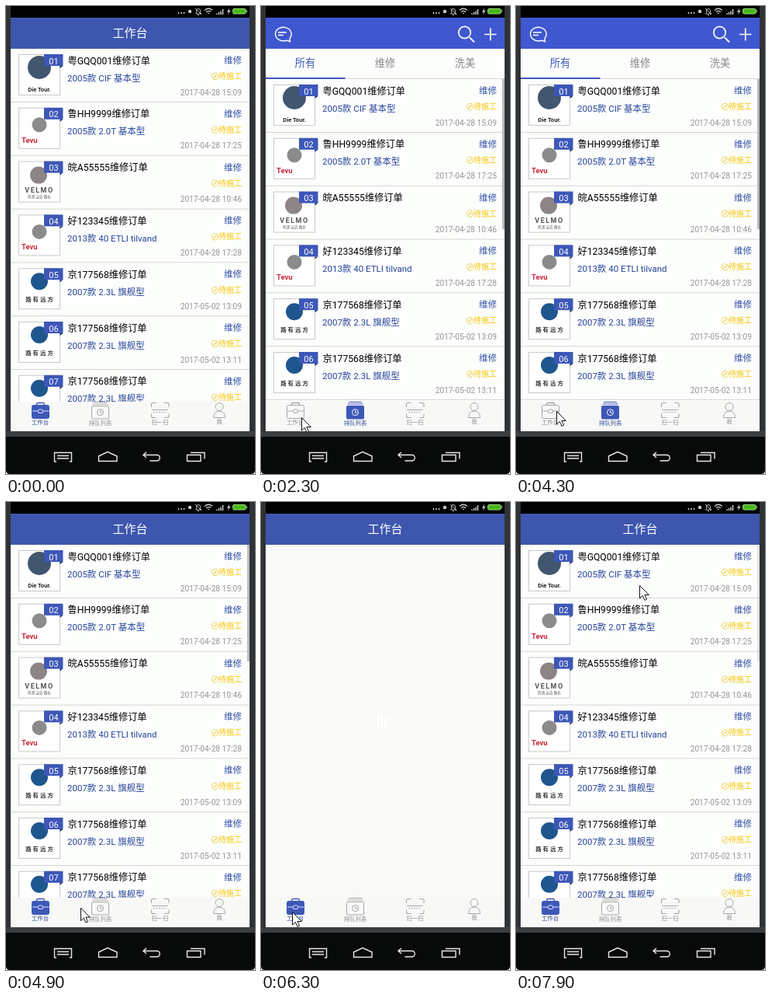
Recreate the animation shown at these times as an HTML page. Size 321x602 px, loop 8 s.

```html
<!DOCTYPE html>
<html lang="zh-CN">
<head>
<meta charset="utf-8">
<title>工作台</title>
<style>
  html, body { margin: 0; width: 100%; height: 100%; overflow: hidden; background: #fff; }
  svg { display: block; width: 100%; height: 100%; }
  text { font-family: Roboto, 'Noto Sans CJK SC', 'Noto Sans CJK', sans-serif; }
  .line { fill: none; stroke: currentColor; }
  .mid { text-anchor: middle; }
  .end { text-anchor: end; }
</style>
</head>
<body>
<svg id="stage" viewBox="0 0 321 602"></svg>
<script>
const LOOP = 8000, STEP = 100;
const BLUE = '#3d57b8', ROW = 68.8;

const text = (x, y, size, fill, str, cls = '', extra = '') =>
  `<text x="${x}" y="${y}" font-size="${size}" fill="${fill}" class="${cls}" ${extra}>${str}</text>`;
const rect = (x, y, w, h, fill, extra = '') =>
  `<rect x="${x}" y="${y}" width="${w}" height="${h}" fill="${fill}" ${extra}/>`;
const path = (d, color, width = 1, extra = '') =>
  `<path class="line" d="${d}" color="${color}" stroke-width="${width}" ${extra}/>`;
const circle = (x, y, r, fill, extra = '') =>
  `<circle cx="${x}" cy="${y}" r="${r}" fill="${fill}" ${extra}/>`;

// Thumbnails, relative to the top of a row.
const thumbs = {
  tour: circle(43, 24, 15, '#42566f') +
    text(43, 54.5, 7.6, '#222', 'Die Tour.', 'mid', 'font-weight="700"'),
  tevu: circle(43, 29, 9.5, '#8b8b8b') +
    text(20, 52, 9.5, '#c8283c', 'Tevu', '', 'font-weight="700"'),
  velmo: circle(42, 25, 11, '#8d8585') +
    text(43, 47, 9, '#555', 'VELMO', 'mid', 'font-weight="700" letter-spacing="1.5"') +
    text(43, 54, 4.6, '#555', '风清 云近 路长', 'mid'),
  road: circle(43, 24, 11, '#1f568e') +
    text(44, 50, 7.4, '#333', '路有远方', 'mid', 'font-weight="700" letter-spacing="2"')
};

const orders = [
  ['tour', '粤GQQ001', '2005款 CIF 基本型', '2017-04-28 15:09'],
  ['tevu', '鲁HH9999', '2005款 2.0T 基本型', '2017-04-28 17:25'],
  ['velmo', '皖A55555', '', '2017-04-28 10:46'],
  ['tevu', '好123345', '2013款 40 ETLI tilvand', '2017-04-28 17:28'],
  ['road', '京177568', '2007款 2.3L 旗舰型', '2017-05-02 13:09'],
  ['road', '京177568', '2007款 2.3L 旗舰型', '2017-05-02 13:11'],
  ['road', '京177568', '2007款 2.3L 旗舰型', '2017-05-02 13:13']
];

const orderRow = ([thumb, plate, model, date], i) => `<g transform="translate(0 ${i * ROW})">
  ${rect(16.5, 7.5, 53, 52, '#fff', 'stroke="#c9c9c9"')}${thumbs[thumb]}
  ${rect(49, 7, 24.5, 15, BLUE)}<path d="M69.5 22h4l-4 3z" fill="#1d2f75"/>
  ${text(61.5, 19.5, 11, '#fff', '0' + (i + 1), 'mid')}
  ${text(79.5, 19.5, 12.2, '#000', plate + '维修订单')}
  ${text(79, 41.5, 11.5, '#26439c', model)}
  ${text(304, 19, 11.5, '#2f4da6', '维修', 'end')}
  ${circle(269.5, 35.5, 4.2, 'none', 'stroke="#f2cc40" stroke-width=".9"')}
  ${path('M267.5 37.5l4-4', '#f2cc40', 1.2)}
  ${text(304, 39, 10, '#f5c400', '待施工', 'end')}
  ${text(304, 59.5, 10.2, '#959595', date, 'end')}
  ${rect(6, 68, 308, 1, '#d5d6d4')}
</g>`;

const orderList = top => `<g transform="translate(0 ${top})">${orders.map(orderRow).join('')}</g>`;

const statusBar = rect(6, 0, 308, 15, '#000') +
  [222.5, 226, 229.5].map(x => circle(x, 9, 1, '#ddd')).join('') +
  circle(237, 7, 2.2, '#ccc') +
  path('M244.5 10h7l-1-1.5V6a2.5 2.5 0 0 0-5 0v2.5zM247 11.5h2M244 3l8 8', '#ccc', .9) +
  path('M256 5.5q5-4.5 10 0M258 7.7q3-2.6 6 0M260 9.7q1-1 2 0', '#ccc', 1.2) +
  path('M272 11V9.5M274.5 11V8M277 11V6.5M279.5 11V4', '#ccc', 1.5) +
  '<path d="M288 2.5l-3 5h2l-1 4 3.5-5.5h-2z" fill="#ccc"/>' +
  rect(292.5, 3.5, 16.5, 6.5, '#48b818', 'rx="1.5" stroke="#9ad77f"') + rect(309.5, 5, 1.2, 3.5, '#9ad77f');

const deviceKeys =
  path('M65 586h-2.5v-11.5h22v11.5h-2.5M66 578.5h15M66 582h15', '#e8e8e8', 1.4) +
  path('M119.5 585.5v-6.5l11.5-5.500 12 5.500v6.500z', '#e8e8e8', 1.4) +
  path('M181 574l-4 3.5 4 3.5M177.5 577.5h17a3.7 3.7 0 0 1 0 7.5h-9', '#e8e8e8', 1.4) +
  path('M233.5 577.5h17.5v8h-17.5zM238 574.5h18v8', '#e8e8e8', 1.4);

const device = rect(0, 0, 321, 560, '#303336') + rect(0, 547, 321, 7, '#3b3d40') +
  '<path d="M0 554h321v43q0 5-5 5h-311q-5 0-5-5z" fill="#080909"/>' + deviceKeys;

const headerIcons =
  path('M34 44.5l3.5 1.5-.5-4.5a10.3 8.8 0 1 0-5 3z', '#fff', 1.4) +
  path('M22 34h11M22 37.5h7', '#fff', 1.3) +
  path('M269 40.5l6 6', '#fff', 2) + circle(262.5, 34, 7.7, 'none', 'stroke="#fff" stroke-width="1.7"') +
  path('M288 36.5h15.5M295.8 28.5v16', '#fff', 1.7);

const filters = text(57, 77.5, 13.2, BLUE, '所有', 'mid') +
  text(160, 77.5, 13.2, '#888', '维修', 'mid') +
  text(263, 77.5, 13.2, '#888', '洗美', 'mid') + rect(6, 92, 102.5, 2, BLUE);

const loader = `<g id="loader">${[0, 1, 2, 3, 4].map(i => rect(150 + i * 4.3, 273, 2.4, 19, '#fff')).join('')}</g>`;

function briefcase(active) {
  const edge = active ? BLUE : '#a5a7a5', seam = active ? '#dfe5ff' : edge;
  return path('M39.5 514v-1.5q0-2 2-2h6q2 0 2 2v1.5', edge, 1.3) +
    rect(33.5, 513.5, 22, 17, active ? BLUE : 'none', `rx="2" stroke="${edge}"`) +
    path('M34 521h7.5M48 521h7.5', seam) +
    rect(41.5, 519, 6, 4.5, active ? BLUE : 'none', `rx="1.5" stroke="${seam}"`);
}

function queueIcon(active) {
  const edge = active ? BLUE : '#a5a7a5', clock = active ? '#fff' : edge;
  return path('M113 509.5h17M111.5 512h20', edge) +
    rect(110.5, 514.5, 22, 16.5, active ? BLUE : 'none', `rx="1" stroke="${edge}"`) +
    circle(121.5, 522.7, 4, 'none', `stroke="${clock}"`) + path('M121.5 520.5v2.5h2.5', clock);
}

function bottomBar(active) {
  const color = i => i === active ? '#2f489d' : '#8c8e8c';
  return rect(6, 509, 308, 38, '#f8f9f7') + briefcase(active === 0) + queueIcon(active === 1) +
    path('M187.5 516v-3.5q0-2 2-2h4M204 510.5h4q2 0 2 2v3.5M187.5 524.5v3q0 2 2 2h4M204 529.5h4q2 0 2-2v-3M188 519.5h21', '#a5a7a5', 1.1) +
    path('M190 522.5h17', '#a5a7a5', 1, 'stroke-dasharray="2 1.5"') +
    circle(275, 515.5, 5, 'none', 'stroke="#a5a7a5"') +
    path('M267.5 529.5q0-8 7.5-8.5 7.5.5 7.5 8.5z', '#a5a7a5') +
    text(44, 538, 7.4, color(0), '工作台', 'mid') + text(121.5, 539, 7.4, color(1), '排队列表', 'mid') +
    text(198.5, 538, 7.4, color(2), '扫一扫', 'mid') + text(275, 537, 7.4, color(3), '我', 'mid');
}

const pages = [
  { top: 55, thumbHeight: 150, empty: '#f9faf6',
    header: rect(6, 15, 308, 40, '#3e56ae') + text(160, 39.5, 15, '#fff', '工作台', 'mid'),
    waiting: loader, extra: '' },
  { top: 94, thumbHeight: 193, empty: '#fcfefb',
    header: rect(6, 15, 308, 40, '#3f58d0') + headerIcons + rect(6, 93, 308, 1, '#d5d6d4'),
    waiting: '', extra: filters }
];

const pageGroup = (p, i) => `<g id="page${i}">
  ${rect(6, 55, 308, 492, p.empty)}${p.header}
  <g class="waiting">${p.waiting}</g>
  <g class="loaded">${rect(6, p.top, 308, 453, '#fcfefb')}${p.extra}${orderList(p.top)}
    <g class="scroll">${rect(311, p.top, 3, p.thumbHeight, '#b9bbb9')}</g></g>
  ${bottomBar(i)}</g>`;

const stage = document.getElementById('stage');
stage.innerHTML = `<clipPath id="screen"><rect x="6" y="0" width="308" height="547"/></clipPath>` +
  device + `<g clip-path="url(#screen)">${pages.map(pageGroup).join('')}${statusBar}</g>` +
  `<path id="cursor" d="M.5.5v16.5l3.8-3.6 2.7 6 2.6-1.2-2.7-5.7h5.4z" fill="#fff" stroke="#111"/>`;

// Each visit: start time, page index, time its list appears.
const visits = [
  [0, 0, 0], [1400, 1, 1800], [2700, 0, 3000], [3700, 1, 4000],
  [4600, 0, 4900], [5400, 1, 5700], [6200, 0, 6500]
];

// Pointer path: time, x, y.
const pointer = [
  [100, 274, 297], [300, 232, 363], [500, 168, 475], [700, 120, 559], [900, 117, 537],
  [1400, 117, 534], [1800, 117, 534], [2200, 60, 530], [2300, 52, 529], [2900, 52, 529],
  [3400, 118, 522], [3900, 118, 522], [4300, 52, 521], [4700, 52, 521], [5000, 118, 522],
  [5400, 118, 522], [5500, 89, 525], [5700, 42, 529], [5900, 40, 527], [6700, 40, 527],
  [7000, 105, 430], [7300, 180, 330], [7500, 200, 260], [7700, 176, 203], [7800, 152, 168],
  [7900, 159, 107]
];

function pointerAt(t) {
  const next = pointer.findIndex(key => key[0] >= t);
  if (next <= 0) return pointer[0].slice(1);
  const [t0, x0, y0] = pointer[next - 1], [t1, x1, y1] = pointer[next];
  const k = (t - t0) / (t1 - t0);
  return [x0 + (x1 - x0) * k, y0 + (y1 - y0) * k];
}

const groups = pages.map((_, i) => document.getElementById('page' + i));
const cursor = document.getElementById('cursor');
const bars = [...document.querySelectorAll('#loader rect')];
const show = (el, on) => { el.style.display = on ? '' : 'none'; };

function draw(t) {
  const [start, index, ready] = visits.filter(v => v[0] <= t).pop();
  groups.forEach((g, i) => show(g, i === index));
  const page = groups[index];
  show(page.querySelector('.waiting'), t < ready);
  show(page.querySelector('.loaded'), t >= ready);
  const fade = Math.min(1, Math.max(0, (t - 7600) / 500));
  page.querySelector('.scroll').style.opacity = start === 0 ? 0 : 1 - fade;
  bars.forEach((bar, i) => {
    bar.setAttribute('opacity', .75 + .25 * Math.sin(t / 120 - i));
  });
  const [x, y] = pointerAt(t);
  show(cursor, t >= 100);
  cursor.setAttribute('transform', `translate(${x} ${y})`);
}

function tick(now) {
  draw(Math.floor(now % LOOP / STEP) * STEP);
  requestAnimationFrame(tick);
}
draw(0);
requestAnimationFrame(tick);
</script>
</body>
</html>
```
